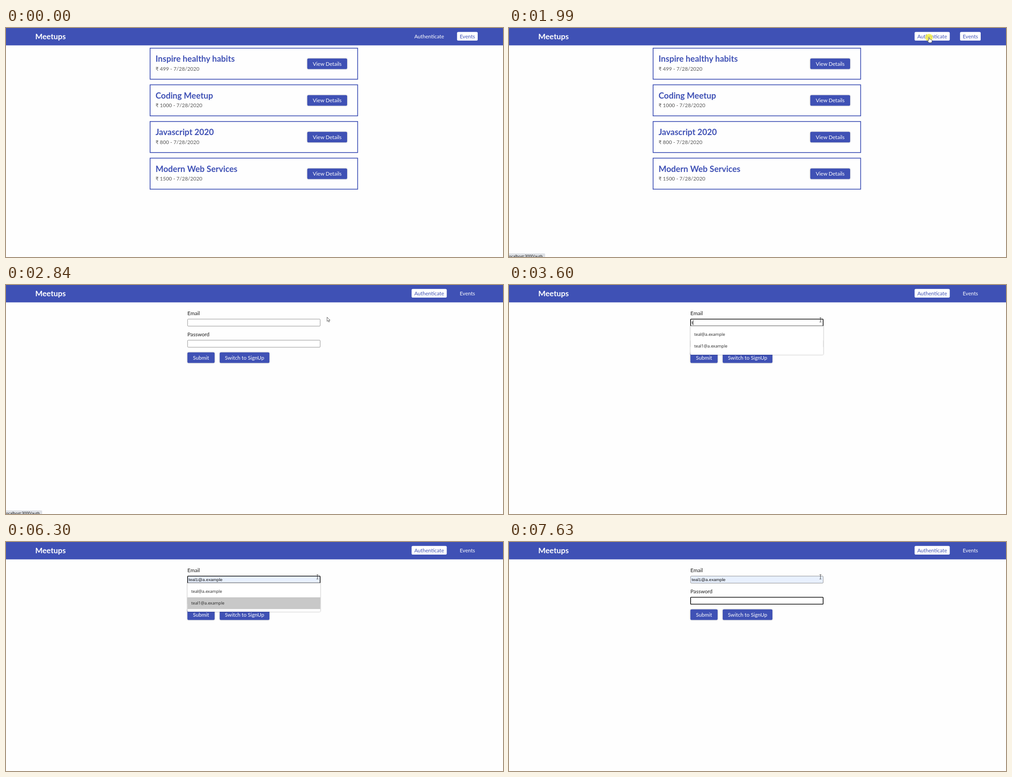
Recreate the animation shown at these times as an HTML page. Size 1100 px wide and 509 px high, loop 8000 ms.

```html
<!DOCTYPE html>
<html lang="en">
<head>
<meta charset="utf-8">
<title>Meetups</title>
<style>
  html, body { margin: 0; width: 100%; height: 100%; overflow: hidden; background: #fefefe; }
  svg { display: block; width: 100%; height: 100%; font: 11.6px Lato, sans-serif; }
  text { white-space: pre; }
  .brand { font-size: 17.2px; font-weight: 700; fill: #fff; }
  .title { font-size: 18.5px; font-weight: 700; fill: #3f51b5; }
  .price { font-size: 11.5px; font-weight: 500; fill: #666; }
  .label { fill: #1c1c1c; }
  .card { fill: none; stroke: #3f51b5; stroke-width: 1.7; }
  .button rect { fill: #3f51b5; filter: drop-shadow(.7px .7px 1.5px rgba(0, 0, 0, .3)); }
  .button text { fill: #fff; text-anchor: middle; }
  .nav rect { fill: none; }
  .nav text { fill: #fff; text-anchor: middle; }
  .nav.on rect { fill: #fff; }
  .nav.on text { fill: #3f51b5; }
  .input { fill: #fff; stroke: #858585; stroke-width: .9; }
  .input.filled { fill: #e8f0fe; }
  .input.focus { stroke: #101010; stroke-width: 1.6; }
  .value { font: 9.6px "Liberation Sans", Arial, sans-serif; fill: #111; }
  .caret { fill: #111; }
  .panel { fill: #fff; filter: drop-shadow(0 .7px 1.2px rgba(0, 0, 0, .45)); }
  .option { font: 500 9.2px "Open Sans", sans-serif; fill: #222; }
  .status { font: 8.3px "Open Sans", sans-serif; }
  .pointer { fill: #fff; stroke: #333; stroke-width: .8; stroke-linejoin: round; }
</style>
</head>
<body>
<script>
const DURATION = 8000;
const FIRST = 'teal@a.example';
const SECOND = 'teal1@a.example';

const text = (cls, x, y, value, id = '') => `<text id="${id}" class="${cls}" x="${x}" y="${y}">${value}</text>`;

const button = (x, y, width, label) => `<g class="button">
  <rect x="${x}" y="${y}" width="${width}" height="23.5" rx="2.8"/>
  ${text('', x + width / 2, y + 16.1, label)}</g>`;

const nav = (id, x, width, label) => `<g id="${id}" class="nav">
  <rect x="${x}" y="8.8" width="${width}" height="19.3" rx="2.8"/>
  ${text('', x + width / 2, 22.9, label)}</g>`;

const input = (id, y) => `<rect id="${id}" class="input" x="401.9" y="${y}" width="293.4" height="15.6" rx="1.4"/>`;

const card = ([title, price], i) => `<g transform="translate(0 ${i * 81.5})">
  <rect class="card" x="318.9" y="44.8" width="459.4" height="69"/>
  ${text('title', 331, 75.3, title)}
  ${text('price', 331, 94.9, `₹ ${price} - 7/28/2020`)}
  ${button(666.8, 67.7, 88.2, 'View Details')}</g>`;

const events = [
  ['Inspire healthy habits', 499],
  ['Coding Meetup', 1000],
  ['Javascript 2020', 800],
  ['Modern Web Services', 1500]
];

document.body.innerHTML = `<svg viewBox="0 0 1100 509">
  <rect width="1100" height="509" fill="#fefefe"/>
  <rect width="1100" height="38.6" fill="#3f51b5"/>
  ${text('brand', 64.7, 24.9, 'Meetups')}
  ${nav('authLink', 897.7, 77.8, 'Authenticate')}
  ${nav('eventsLink', 998.3, 45.7, 'Events')}
  <g id="list">${events.map(card).join('')}</g>
  <g id="form">
    ${text('label', 401.6, 67.1, 'Email')}
    ${input('email', 75.8)}
    ${text('value', 404.3, 86.7, '', 'emailText')}
    ${text('label', 401.6, 114.4, 'Password')}
    ${input('password', 122.7)}
    ${button(401.5, 149.7, 60.2, 'Submit')}
    ${button(473, 149.7, 110, 'Switch to SignUp')}
    <rect id="caret" class="caret" width=".9" height="11"/>
    <g id="menu">
      <path class="panel" d="M401.5 91H695.7V153q0 2-2 2H403.5q-2 0-2-2Z"/>
      <path d="M401.5 91.2H695.7" stroke="#aaa" stroke-width=".7"/>
      <rect id="row" x="401.5" width="294.2" height="26" fill="#c8c8c8"/>
      ${text('option', 410, 112.9, FIRST)}
      ${text('option', 410, 138.8, SECOND)}
    </g>
  </g>
  <g id="status" class="status">
    <path d="M0 501H78q2 0 2 2V509H0Z" fill="#dee1e6"/>
    ${text('', -2, 511, 'localhost:3000/auth')}
  </g>
  <circle id="click" cx="929.5" cy="21.3" r="8.4" fill="#f4ee3c" opacity=".8"/>
  <g id="cursor">
    <path id="arrow" class="pointer" d="M0 0V9.3L2.2 7.3 3.8 10.8 5.3 10.1 3.8 6.8H6.7Z"/>
    <path id="hand" class="pointer" d="M-1 .8Q0-.6 1 .8V4.2Q2.2 3.5 3 4.6 4.2 4 4.9 5.1 6.8 4.9 6.8 6.5V9L5.5 12H-.4L-3 7.6Q-3.3 6.2-2.2 6.3L-1 7.5Z"/>
    <path id="beam" d="M-2-5H-.5L0-4.5 .5-5H2M0-4.5V4.5M-2 5H-.5L0 4.5 .5 5H2" fill="none" stroke="#333" stroke-width=".9"/>
  </g>
</svg>`;

const el = Object.fromEntries([...document.querySelectorAll('[id]')].filter(n => n.id).map(n => [n.id, n]));

// Pointer path: time, x, y, shape
const path = [
  [270, 1020.5, 411, 'arrow'], [350, 1013, 332, 'arrow'], [430, 1009.6, 282.4, 'arrow'],
  [740, 1008, 271, 'arrow'], [820, 1000, 240, 'arrow'], [890, 986, 195, 'arrow'],
  [970, 969, 145, 'arrow'], [1050, 954, 109, 'arrow'], [1120, 946.5, 92.5, 'arrow'],
  [1350, 943, 74, 'arrow'], [1430, 935, 40, 'arrow'], [1520, 929.5, 20.8, 'hand'],
  [2600, 905, 24, 'hand'], [2680, 850, 37, 'arrow'], [2760, 772, 56, 'arrow'],
  [2840, 710.6, 71.5, 'arrow'], [2920, 698, 75, 'arrow'], [2990, 692, 77, 'beam'],
  [3060, 690, 77.4, 'beam'], [3210, 689.3, 77.4, 'beam']
];

// Email field: time, value, caret x (0 hides it)
const typing = [
  [0, '', 0], [3600, 't', 407], [3760, 'te', 412.3], [4000, 'tea', 417.6], [4130, 'teal', 419.8],
  [4600, FIRST, 0], [6300, SECOND, 0], [6700, SECOND, 479.6], [7090, SECOND, 0]
];

const latest = (steps, t) => steps.findLast(step => step[0] <= t);
const show = (node, on) => node.setAttribute('display', on ? 'inline' : 'none');

function draw(t) {
  const within = (from, to) => t >= from && t < to;
  const onForm = t >= 2220;
  show(el.list, !onForm);
  show(el.form, onForm);
  el.authLink.classList.toggle('on', t >= 1520);
  el.eventsLink.classList.toggle('on', !onForm);

  const [, value, caretX] = latest(typing, t);
  const passwordCaret = within(7090, 7630);
  el.emailText.textContent = value;
  el.email.classList.toggle('focus', within(3600, 7090));
  el.email.classList.toggle('filled', t >= 4600);
  el.password.classList.toggle('focus', t >= 7090);
  show(el.caret, caretX || passwordCaret);
  el.caret.setAttribute('x', passwordCaret ? 404.1 : caretX);
  el.caret.setAttribute('y', passwordCaret ? 125 : 78);

  show(el.menu, within(3600, 6700));
  show(el.row, t >= 4600);
  el.row.setAttribute('y', t < 6300 ? 97 : 123);

  show(el.status, within(1660, 2990));
  el.status.setAttribute('opacity', within(1740, 2920) ? 1 : .5);
  show(el.click, within(1990, 2220));

  const point = latest(path, t);
  show(el.cursor, point);
  if (point) {
    const [, x, y, shape] = point;
    el.cursor.setAttribute('transform', `translate(${x} ${y})`);
    for (const name of ['arrow', 'hand', 'beam']) show(el[name], name === shape);
  }
}

const start = performance.now();
function tick() {
  draw((performance.now() - start) % DURATION);
  requestAnimationFrame(tick);
}
tick();
</script>
</body>
</html>
```
